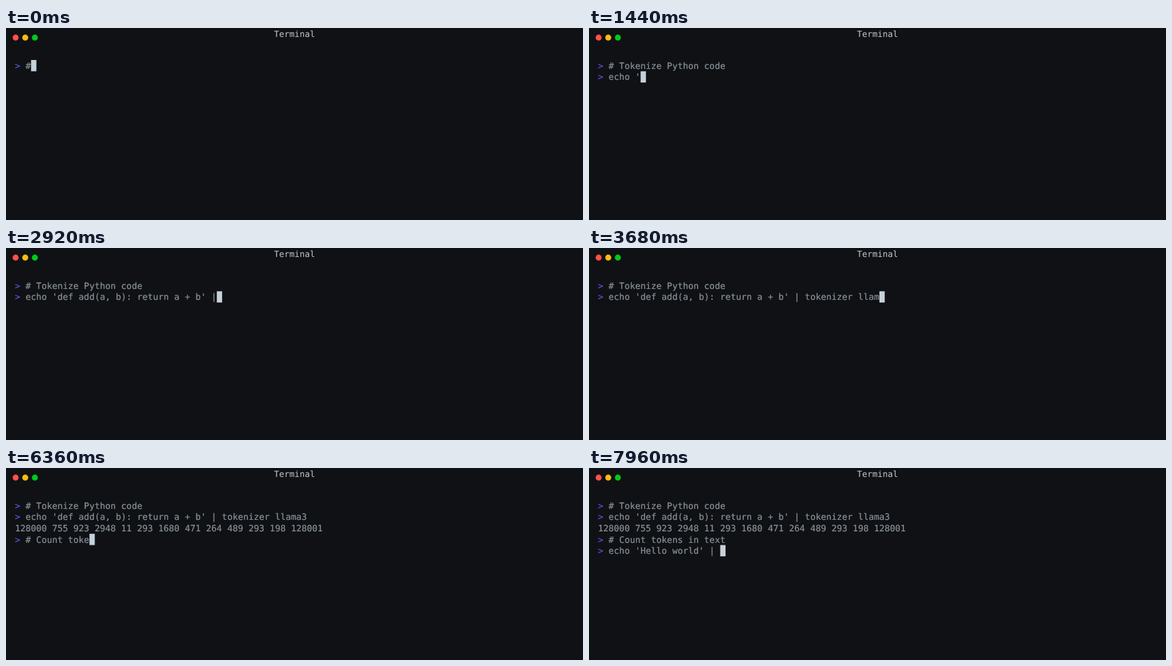
Recreate the animation shown at these times as an HTML page. Size 900 by 300 pixels, loop 8000 ms.

```html
<!DOCTYPE html>
<html lang="en">
<head>
<meta charset="utf-8">
<title>Terminal</title>
<style>
  html, body { margin: 0; width: 100%; height: 100%; overflow: hidden; background: #101114; }
  svg { display: block; width: 900px; height: 300px; }
  text { font-family: "DejaVu Sans Mono", monospace; white-space: pre; text-rendering: geometricPrecision; }
  #title { font-size: 13.25px; fill: #c3c8cc; text-anchor: middle; }
  .line { font-size: 13.75px; fill: #87929b; stroke: #87929b; stroke-width: .2px; }
  .prompt { fill: #5a56e0; stroke: #5a56e0; }
</style>
</head>
<body>
<svg viewBox="0 0 900 300">
  <rect width="900" height="300" fill="#101114"/>
  <circle cx="15" cy="15" r="4.7" fill="#ff4f4d"/>
  <circle cx="30" cy="15" r="4.7" fill="#febb12"/>
  <circle cx="45" cy="15" r="4.7" fill="#00ca1d"/>
  <text id="title" x="450" y="14">Terminal</text>
  <g id="lines"></g>
  <rect id="cursor" width="8.28" height="17.6" fill="#c5d1da"/>
</svg>
<script>
const LOOP = 8000, TICK = 40, KEY = 50;
const LEFT = 14, TOP = 50, CELL = 8.277, ROW = 17.6;

const NOTE = "# Tokenize Python code";
const COMMAND = "echo 'def add(a, b): return a + b' | tokenizer llama3";
const OUTPUT = "128000 755 923 2948 11 293 1680 471 264 489 293 198 128001";
const NOTE2 = "# Count tokens in text";
const COMMAND2 = "echo 'Hello world' | ";

const svgNode = (name, parent) =>
  parent.appendChild(document.createElementNS("http://www.w3.org/2000/svg", name));

const group = document.getElementById("lines");
const cursor = document.getElementById("cursor");
const rows = Array.from({ length: 5 }, (_, i) => {
  const text = svgNode("text", group);
  text.setAttribute("class", "line");
  text.setAttribute("x", LEFT);
  text.setAttribute("y", TOP + i * ROW + 13.7);
  const prompt = svgNode("tspan", text);
  prompt.setAttribute("class", "prompt");
  return { prompt, body: svgNode("tspan", text) };
});

// Keys pressed by time t, seen at the screen's refresh ticks
function keysSince(t, start) {
  const shown = Math.floor(t / TICK) * TICK + TICK / 2;
  return Math.max(0, Math.floor((shown - start) / KEY) + 1);
}

const entry = text => ({ prompt: "> ", text });

// A note is typed, then Enter opens a prompt for the command
function typeLines(note, command, keys) {
  const lines = [entry(note.slice(0, keys))];
  if (keys > note.length) lines.push(entry(command.slice(0, keys - note.length - 1)));
  return lines;
}

function screenAt(t) {
  const keys = keysSince(t, 80) + 1;
  const lines = typeLines(NOTE, COMMAND, keys);
  const entered = keys - NOTE.length - COMMAND.length - 1;
  if (entered === 1) lines.push({ prompt: "", text: "" });
  if (entered > 1) {
    lines.push({ prompt: "", text: OUTPUT });
    lines.push(...typeLines(NOTE2, COMMAND2, keysSince(t, 5810)));
  }
  return lines;
}

const cursorOn = t => !(t >= 4480 && t < 5040 || t >= 5640 && t < 5800);

function draw(t) {
  const lines = screenAt(t);
  rows.forEach(({ prompt, body }, i) => {
    const line = lines[i] || { prompt: "", text: "" };
    prompt.textContent = line.prompt;
    body.textContent = line.text;
  });
  const last = lines[lines.length - 1];
  cursor.setAttribute("x", LEFT + (last.prompt.length + last.text.length) * CELL + .3);
  cursor.setAttribute("y", TOP + (lines.length - 1) * ROW);
  cursor.setAttribute("visibility", cursorOn(t) ? "visible" : "hidden");
}

const begin = performance.now();
function frame() {
  draw((performance.now() - begin) % LOOP);
  requestAnimationFrame(frame);
}
draw(0);
requestAnimationFrame(frame);
</script>
</body>
</html>
```
